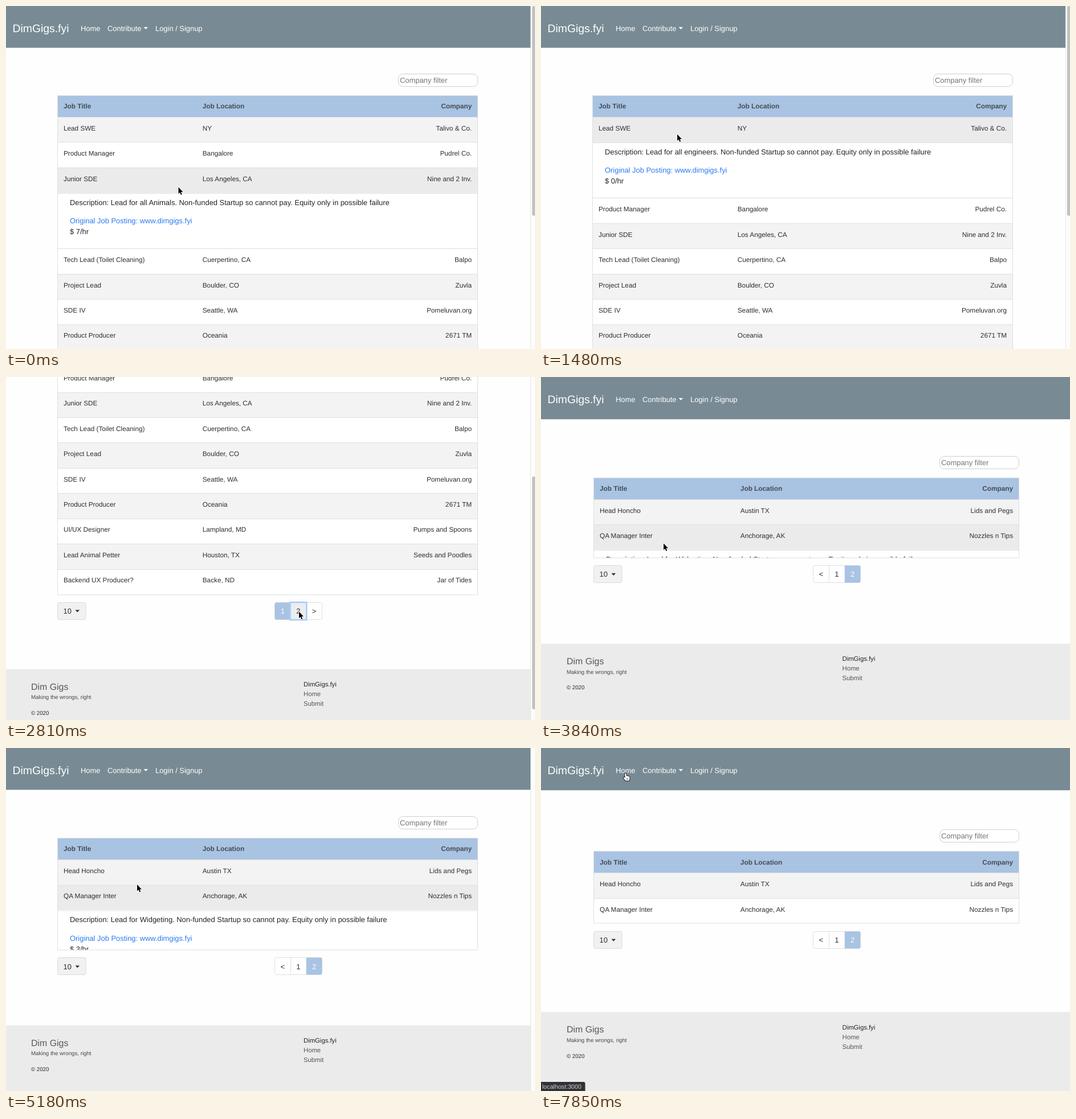
These frames come from a looping animation (928x603 px, 8000 ms). An HTML page with a canvas:

```html
<!DOCTYPE html>
<html lang="en">
<head>
<meta charset="utf-8">
<title>Job list</title>
<style>
  html, body { margin: 0; width: 928px; height: 603px; overflow: hidden; background: #fff; }
  canvas { display: block; }
</style>
</head>
<body>
<canvas id="stage" width="928" height="603"></canvas>
<script>
const ctx = document.getElementById('stage').getContext('2d');
const LOOP = 8000, STEP = 147.6;          // the screen refreshes once per STEP
const ROW = 44.45, HEAD = 38.5, PANEL = 98, SCROLL = 257.4;
const INK = '#2b2e31', LINE = '#dcdfe2', BLUE = '#a9c3e2';

const PAGES = [
  [
    ['Lead SWE', 'NY', 'Talivo & Co.', 'all engineers', 0],
    ['Product Manager', 'Bangalore', 'Pudrel Co.'],
    ['Junior SDE', 'Los Angeles, CA', 'Nine and 2 Inv.', 'all Animals', 7],
    ['Tech Lead (Toilet Cleaning)', 'Cuerpertino, CA', 'Balpo'],
    ['Project Lead', 'Boulder, CO', 'Zuvla'],
    ['SDE IV', 'Seattle, WA', 'Pomeluvan.org'],
    ['Product Producer', 'Oceania', '2671 TM'],
    ['UI/UX Designer', 'Lampland, MD', 'Pumps and Spoons'],
    ['Lead Animal Petter', 'Houston, TX', 'Seeds and Poodles'],
    ['Backend UX Producer?', 'Backe, ND', 'Jar of Tides']
  ],
  [
    ['Head Honcho', 'Austin TX', 'Lids and Pegs'],
    ['QA Manager Inter', 'Anchorage, AK', 'Nozzles n Tips', 'Widgeting', 3]
  ]
];

// step, x, y of the pointer tip
const POINTER = [
  [2, 302.5, 318.5], [6, 241, 214], [10, 239, 225.5], [13, 239, 225.5], [18, 514, 412.5],
  [20, 514, 412.5], [25, 215, 292.5], [28, 215, 292.5], [32, 230, 240], [36, 230, 240],
  [40, 242, 40], [47, 242, 40], [51, 149, 44.5]
];

const clamp = (v, lo, hi) => Math.min(hi, Math.max(lo, v));
const smooth = p => (p = clamp(p, 0, 1), p * p * (3 - 2 * p));

function pointerAt(n) {
  const i = POINTER.findIndex(k => k[0] > n);
  if (i === 0) return POINTER[0].slice(1);
  if (i < 0) return POINTER[POINTER.length - 1].slice(1);
  const [n0, x0, y0] = POINTER[i - 1], [n1, x1, y1] = POINTER[i];
  const p = smooth((n - n0) / (n1 - n0));
  return [x0 + (x1 - x0) * p, y0 + (y1 - y0) * p];
}

// Height of a detail panel: linear opening, fast decaying close
function panelHeight(n, open, close) {
  if (n < close) return clamp((n - open) * 49, 0, PANEL);
  return n - close > 2.7 ? 0 : 70 * Math.exp(-1.5 * (n - close));
}

function text(str, x, mid, size, color = INK, align = 'left', weight = '') {
  ctx.font = `${weight} ${size}px "Liberation Sans", Arial, sans-serif`;
  ctx.textRendering = 'geometricPrecision';
  ctx.fillStyle = color;
  ctx.textAlign = align;
  ctx.fillText(str, x, mid + size * 0.35);
}

function rect(x, y, w, h, color) {
  ctx.fillStyle = color;
  ctx.fillRect(x, y, w, h);
}

function box(x, y, w, h, radius, fill, stroke) {
  ctx.beginPath();
  ctx.roundRect(x, y, w, h, radius);
  if (fill) { ctx.fillStyle = fill; ctx.fill(); }
  if (stroke) { ctx.strokeStyle = stroke; ctx.lineWidth = 1; ctx.stroke(); }
}

function shape(d, x, y, fill, stroke, width) {
  const path = new Path2D(d);
  ctx.save();
  ctx.translate(x, y);
  ctx.lineJoin = 'round';
  if (stroke) { ctx.strokeStyle = stroke; ctx.lineWidth = width; ctx.stroke(path); }
  ctx.fillStyle = fill;
  ctx.fill(path);
  ctx.restore();
}

const caret = (x, y, color) => shape('M0 0H7.6L3.8 4Z', x, y, color);

function drawNav(y, width, extra) {
  rect(0, y, width, 73.5 + extra, '#788b94');
  text('DimGigs.fyi', 11.5, y + 39.5, 19.38, '#fff');
  text('Home', 131, y + 39.5, 12.92, '#fff');
  text('Contribute', 178, y + 39.5, 12.92, '#fff');
  caret(241.5, y + 37, '#fff');
  text('Login / Signup', 262, y + 39.5, 12.92, '#fff');
}

function drawPanel(row, x, y, width, height) {
  ctx.save();
  ctx.beginPath();
  ctx.rect(x, y, width, height);
  ctx.clip();
  rect(x, y, width, height, '#fff');
  rect(x, y, width, 1, LINE);
  const left = x + 21.5;
  text(`Description: Lead for ${row[3]}. Non-funded Startup so cannot pay. Equity only in possible failure`,
    left, y + 16.5, 12.92, '#212529');
  text('Original Job Posting: www.dimgigs.fyi', left, y + 49, 12.92, '#2b7bf3');
  text(`$ ${row[4]}/hr`, left, y + 68, 12.92, '#212529');
  ctx.restore();
}

// Returns the bottom edge of the table
function drawTable(rows, heights, top, left, right, pointerY) {
  const width = right - left, middle = left + width * 0.345;
  rect(left, top, width, HEAD, BLUE);
  ['Job Title', 'Job Location', 'Company'].forEach((label, i) =>
    text(label, [left + 10.5, middle, right - 10.5][i], top + 19, 11.8, '#444c55', i > 1 ? 'right' : 'left', 'bold'));
  let y = top + HEAD;
  rows.forEach((row, i) => {
    const hovered = pointerY + 1.5 >= y && pointerY + 1.5 < y + ROW;
    rect(left, y, width, ROW, hovered ? '#ebebeb' : i % 2 ? '#fff' : '#f3f3f3');
    rect(left, Math.floor(y), width, 1, LINE);
    const mid = y + 19.1;
    text(row[0], left + 10.5, mid, 11.75);
    text(row[1], middle, mid, 11.75);
    text(row[2], right - 10.5, mid, 11.75, INK, 'right');
    y += ROW;
    if (heights[i]) {
      drawPanel(row, left, y, width, heights[i]);
      y += heights[i];
    }
  });
  box(left, Math.round(top) + 0.5, width, Math.round(y - top) - 0.5, 0, null, LINE);
  return y;
}

function drawPager(second, y, left, x, pressed) {
  const top = Math.round(y) - 15.5;
  box(left, top, 49.5, 30, 3, '#f1f1f1', '#dadada');
  text('10', left + 10, y, 12.92);
  caret(left + 31, y - 2, INK);
  box(x, top, 83, 30, 3, '#fff', LINE);
  const labels = second ? ['<', '1', '2'] : ['1', '2', '>'];
  const active = second ? 2 : 0;
  labels.forEach((label, i) => {
    const bx = x + i * 27.6;
    if (i === active) box(bx, top, 27.6, 30, i ? [0, 3, 3, 0] : [3, 0, 0, 3], BLUE);
    else if (i) rect(Math.round(bx), top, 1, 30, LINE);
    text(label, bx + 13.8, y, 12.92, i === active ? '#fff' : INK, 'center');
  });
  if (pressed) {
    box(x + 27.6, top, 27.6, 30, 0, '#ebedef');
    ctx.strokeStyle = '#aaccf8';
    ctx.lineWidth = 2.6;
    ctx.strokeRect(x + 27, top - 0.5, 28.8, 31);
    text('2', x + 41.4, y, 12.92, INK, 'center');
  }
}

function drawFooter(y, width, left, right) {
  rect(0, y, width, 700, '#ebebeb');
  text('Dim Gigs', left, y + 30.5, 15.9, '#54575a');
  text('Making the wrongs, right', left, y + 49.5, 9.7, '#45484b');
  text('© 2020', left, y + 77, 9.7, '#212529');
  text('DimGigs.fyi', right, y + 26.5, 11.3, '#212529');
  text('Home', right, y + 43.5, 11.3, '#54575a');
  text('Submit', right, y + 60.5, 11.3, '#54575a');
}

function drawScrollbar(scroll, pageHeight) {
  rect(920, 0, 8, 603, '#fcfcfc');
  rect(920, 0, 1, 603, '#e8e8e8');
  if (pageHeight > 603)
    box(923, scroll / pageHeight * 603, 6, 603 * 603 / pageHeight, 3, '#c1c1c1');
}

function drawPointer(x, y) {
  if (y < 50) {
    shape('M-2 1C-2-.5 0-.5 .3 1L1 5 3 4.6 4.5 5.2 6 6Q7 6.5 6.6 9L5.6 13H-.8L-4 8.4Q-4.6 6.6-2.6 7L-1.2 8Z',
      x, y, '#fff', '#111', 1.8);
    shape('M1.2 8.5H1.8V11.5H1.2ZM3.2 8.5H3.8V11.5H3.2Z', x, y, '#111');
  } else {
    shape('M0 0V11.6L2.6 9.2 4.4 13.4 6.2 12.6 4.5 8.6H8Z', x, y, '#000', '#fff', 1.6);
  }
}

function draw(n) {
  const second = n >= 20;
  const wide = second && (n < 28 || n >= 36);
  const width = wide ? 928 : 920;
  const left = wide ? 92.5 : 90.5, right = wide ? 838.5 : 827.5;
  const heights = second
    ? [0, panelHeight(n, 25.72, 35)]
    : [panelHeight(n, 5.7, 11), 0, panelHeight(n, -9, 6)];
  const spare = second ? Math.max(0, 24.4 - heights[1] / 3) : 0;
  const scroll = second ? 0 : SCROLL * smooth((n - 12.5) / 4.5);
  const [px, py] = pointerAt(n);
  const top = 157 + spare - scroll;

  rect(0, 0, 928, 603, '#fefefe');
  drawNav(-scroll, width, wide ? 0.8 : 0);
  box(right - 139, Math.round(top) - 37.5, 139, 22, 8, '#fff', '#cfcfcf');
  text('Company filter', right - 136.5, top - 26.5, 12.92, '#757575');

  const bottom = drawTable(PAGES[+second], heights, top, left, right, py);
  drawPager(second, bottom + 29, left, wide ? 477.5 : 471.5, n === 18 || n === 19);
  const footer = bottom + 131 + spare;
  drawFooter(footer, width, wide ? 45 : 44, wide ? 528.5 : 522);
  if (!wide) drawScrollbar(scroll, spare ? 603 : footer + scroll + 117);

  if (n >= 41 && n < 48) {
    box(172.5, 56.5, 211, 39.5, 3, '#fff', '#cfd2d4');
    text('Login or Signup to Contribute!', 192, 76, 12.92, '#212529');
  }
  if (n >= 43) {
    const short = n >= 52;
    box(-1, 587, short ? 78.5 : 88, 17, [0, 3, 0, 0], '#303236');
    text(short ? 'localhost:3000' : 'localhost:3000/#', 2, 595.5, 10.7, '#d0d2d4');
  }
  drawPointer(px, py);
}

function tick() {
  draw(Math.floor(performance.now() % LOOP / STEP));
  requestAnimationFrame(tick);
}
tick();
</script>
</body>
</html>
```
